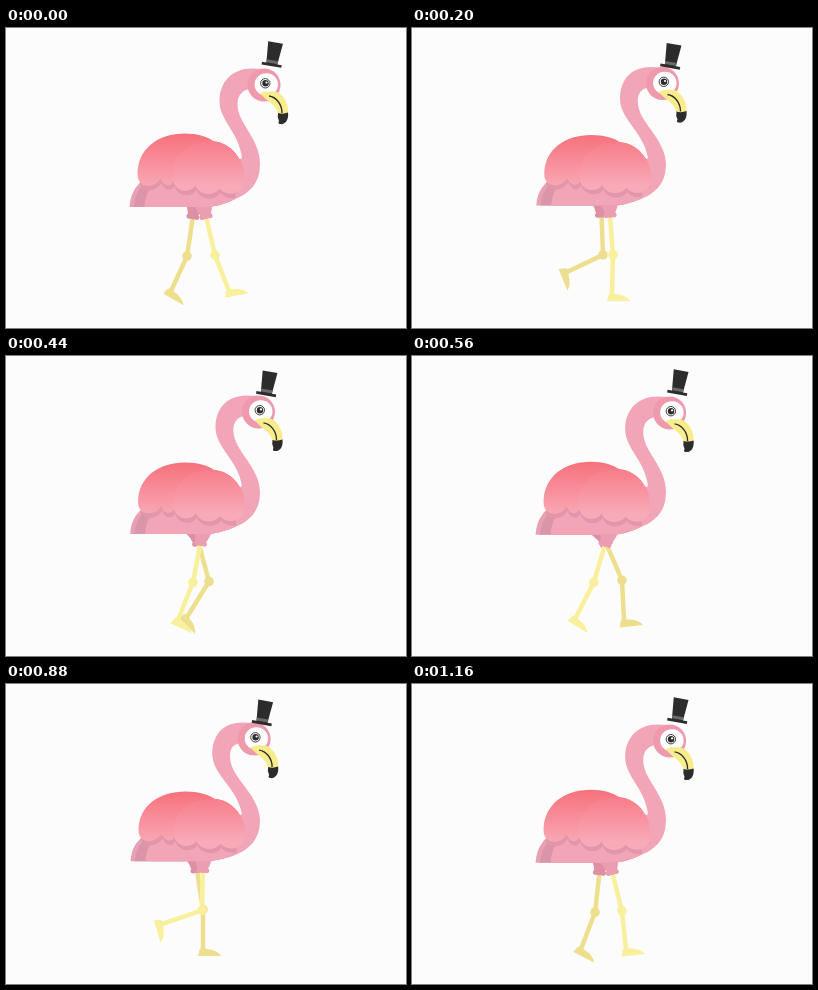
An HTML page with a canvas for the animation above (1200 ms loop, 400 by 300 pixels).

```html
<!DOCTYPE html>
<html lang="en">
<head>
<meta charset="utf-8">
<title>Walking flamingo</title>
<style>
html, body { margin: 0; width: 100%; height: 100%; overflow: hidden; background: #fcfcfc; }
canvas { display: block; width: 400px; height: 300px; }
</style>
</head>
<body>
<canvas id="stage" width="400" height="300"></canvas>
<script>
const ctx = document.getElementById('stage').getContext('2d');
const LOOP = 1200, STEP = 40, RAD = Math.PI / 180;
const PINK = '#f3a5b8', INK = '#2c2c2c';

// Stride poses: time, knee x, ankle x, ankle y, foot angle
const near = {
  hip: 197, shift: 0, skin: '#f9f09d', thigh: '#eb9db1',
  poses: [
    [0, 209, 223, 262, -11], [120, 205, 208, 265, 0], [200, 201, 200, 266, 0],
    [280, 197, 195, 266, 0], [440, 187, 172, 263, 25], [600, 181, 161, 260, 34],
    [720, 184, 154, 251, 50], [880, 196, 156, 239, 73], [1040, 203, 184, 263, 15],
    [1160, 210, 214, 265, -6]
  ]
};
const far = {
  hip: 189, shift: 600, skin: '#eddf8e', thigh: '#de8fa4',
  poses: [
    [0, 209, 221, 262, -11], [120, 205, 207, 264, 0], [280, 197, 197, 265, 0],
    [440, 189, 181, 264, 15], [560, 183, 169, 264, 27], [600, 181, 165, 262, 30],
    [800, 191, 155, 243, 68], [880, 196, 157, 240, 71], [1040, 203, 181, 260, 45],
    [1160, 210, 212, 264, -6]
  ]
};

// Periodic cubic interpolation through the poses
function poseAt(poses, t) {
  const n = poses.length;
  const key = i => {
    const k = poses[(i + n) % n];
    return [k[0] + LOOP * Math.floor(i / n), ...k.slice(1)];
  };
  let i = n - 1;
  while (poses[i][0] > t) i--;
  const [a, b, c, d] = [key(i - 1), key(i), key(i + 1), key(i + 2)];
  const span = c[0] - b[0], u = (t - b[0]) / span;
  return [1, 2, 3, 4].map(j => {
    const m0 = (c[j] - a[j]) / (c[0] - a[0]) * span;
    const m1 = (d[j] - b[j]) / (d[0] - b[0]) * span;
    const u2 = u * u, u3 = u2 * u;
    return (2 * u3 - 3 * u2 + 1) * b[j] + (u3 - 2 * u2 + u) * m0 +
      (3 * u2 - 2 * u3) * c[j] + (u3 - u2) * m1;
  });
}

function fill(shape, color) {
  ctx.fillStyle = color;
  ctx.fill(typeof shape === 'string' ? new Path2D(shape) : shape);
}

function oval(x, y, rx, ry, color) {
  ctx.beginPath();
  ctx.ellipse(x, y, rx, ry, 0, 0, 7);
  ctx.fillStyle = color;
  ctx.fill();
}

function placed(x, y, angle, draw) {
  ctx.save();
  ctx.translate(x, y);
  ctx.rotate(angle);
  draw();
  ctx.restore();
}

function fade(y0, y1, top, bottom) {
  const g = ctx.createLinearGradient(0, y0, 0, y1);
  g.addColorStop(0, top);
  g.addColorStop(1, bottom);
  return g;
}

function drawLeg(leg, t, bob) {
  const [kneeX, footX, footY, turn] = poseAt(leg.poses, (t + leg.shift) % LOOP);
  const hipY = 174 + 1.2 * bob, dx = kneeX - leg.hip;
  const kneeY = hipY + Math.sqrt(53.5 ** 2 - dx * dx);
  ctx.strokeStyle = leg.skin;
  ctx.lineWidth = 4.5;
  ctx.lineJoin = 'round';
  ctx.beginPath();
  ctx.moveTo(leg.hip, hipY);
  ctx.lineTo(kneeX, kneeY);
  ctx.lineTo(footX, footY + 1);
  ctx.stroke();
  oval(kneeX, kneeY, 4.8, 4.8, leg.skin);
  placed(footX, footY, turn * RAD, () =>
    fill('M-5 7L-3.5 1Q-3 -1 0 -1L4 0Q14 1 18.5 7Z', leg.skin));
  placed(leg.hip, hipY, -Math.atan2(dx, kneeY - hipY), () => {
    fill('M-10 0H9Q8 8 4.5 13H-5Q-6 7 -10 0Z', leg.thigh);
    for (const x of [-3.8, 0, 3.8]) oval(x, 13.8, 2.8, 2.5, leg.thigh);
  });
}

const tail = new Path2D('M124 178C125 163 132 154 144 148H230V170Q215 178 198 178Z');
const scallops = 'C239 166 222 169 214 160C208 168 194 167 190 157' +
  'C185 165 171 164 168 153';
const wing = new Path2D('M132 146C132 121 153 106.5 179 106.5C192 106.5 203 110 208 114' +
  'C226 115 240 134 238.5 150' + scallops + 'C165 159 158 158 155 150C150 160 132 161 132 146Z');
const frontWing = new Path2D('M168 153C165 128 181 114 208 114C226 115 240 134 238.5 150' +
  scallops + 'Z');

function drawNeck(sway) {
  // Each point follows the head by its weight
  const p = (x, y, w) => [x + 5 * sway * w, y + sway * w];
  ctx.beginPath();
  ctx.moveTo(...p(258, 41, 1));
  ctx.lineTo(...p(246, 40.5, 1));
  ctx.bezierCurveTo(...p(226, 40.5, 1), ...p(213.5, 54, .8), ...p(213.5, 73, .72));
  ctx.bezierCurveTo(...p(213.5, 93, .6), ...p(233, 104, .2), ...p(236, 130, 0));
  ctx.lineTo(200, 150);
  ctx.lineTo(198, 178);
  ctx.bezierCurveTo(235, 174, 254, 162, 254, 136);
  ctx.bezierCurveTo(...p(254, 110, .1), ...p(231.5, 96, .6), ...p(231.5, 76, .75));
  ctx.bezierCurveTo(...p(231.5, 67, .85), ...p(237, 61, 1), ...p(246, 61, 1));
  ctx.closePath();
  ctx.fillStyle = PINK;
  ctx.fill();
}

function drawBody(bob) {
  ctx.save();
  ctx.translate(185 - .5 * bob, 143);
  ctx.scale(1, 1 + .025 * bob);
  ctx.translate(-185, -143);
  fill(tail, '#e7a1b3');
  ctx.clip(tail);
  fill('M128 180C129 165 136 155 147 149H230V180Z', '#db95a8');
  fill('M139 180C139 168 143 160 151 152H235V180Z', PINK);
  ctx.translate(1, 4.5);
  fill(wing, '#e196a9');
  ctx.restore();

  ctx.save();
  ctx.translate(185 - .5 * bob, 143);
  ctx.scale(1, 1 + .025 * bob);
  ctx.translate(-185, -143);
  fill(wing, fade(106, 160, '#f6717b', '#f9a9b7'));
  fill(frontWing, fade(111, 158, '#f77b85', '#f8aab9'));
  ctx.restore();
}

function drawHead() {
  oval(258, 57, 16.5, 16.5, '#ef99ad');
  oval(260.3, 56.5, 11.7, 11.2, '#fff');
  fill('M254 65Q262 62 271 64C279 68 283 78 282 86L272 86C270 76 261 74 254 65Z', '#f9ec8c');
  fill('M272 85Q277 86.5 282 84.5C283 92 279 97 274 96Q271.5 95.5 273 93Q271 89 272 85Z', INK);
  ctx.strokeStyle = INK;
  ctx.lineWidth = 1.3;
  ctx.stroke(new Path2D('M263 68C270 69 276 76 276 85'));
  ctx.lineWidth = .9;
  ctx.beginPath();
  ctx.arc(259.3, 55.3, 4.7, 0, 7);
  ctx.stroke();
  oval(259.5, 55.3, 3.2, 3.2, INK);
  oval(260.5, 54.5, 1.1, 1.1, '#fff');
}

function drawHat() {
  fill('M-7.5 -12H7.5L5.5 10H-5.5Z', INK);
  fill('M-5.9 6H5.9L5.6 9H-5.6Z', '#6a6a6a');
  fill('M-10 9.3H10V12H-10Z', INK);
}

function draw(t) {
  const bob = Math.cos(t / 600 * 2 * Math.PI), sway = bob - 1;
  ctx.fillStyle = '#fcfcfc';
  ctx.fillRect(0, 0, 400, 300);
  drawLeg(far, t, bob);
  drawLeg(near, t, bob);
  drawNeck(sway);
  drawBody(bob);
  placed(5 * sway, sway, 0, drawHead);
  placed(267.5 + 5 * sway, 26.3 - 1.2 * sway, 10 * RAD, drawHat);
}

const start = performance.now();
function tick() {
  const t = (performance.now() - start) % LOOP;
  draw(Math.floor(t / STEP) * STEP);
  requestAnimationFrame(tick);
}
tick();
</script>
</body>
</html>
```
